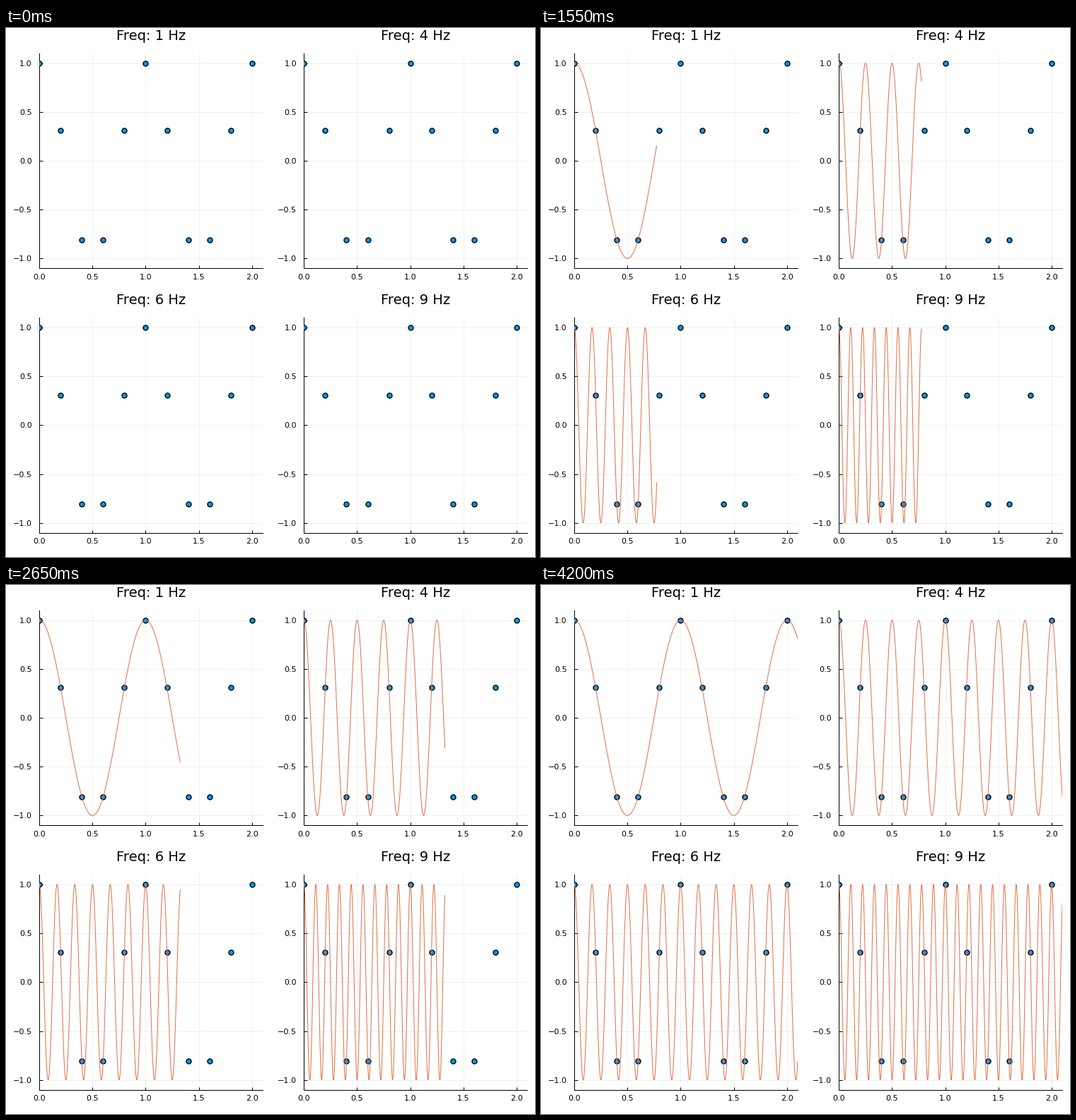
Write a matplotlib script that moves like this. It is 748 by 749 pixels and loops after 4250 ms.

```python
import numpy as np
import matplotlib.pyplot as plt
from matplotlib.animation import FuncAnimation

W, H, DPI = 748, 749, 100
FRAMES, INTERVAL = 85, 50
PX = 72 / DPI  # points per pixel
STEP, PER_FRAME = 0.001, 25

plt.rcParams["font.family"] = "DejaVu Sans"
plt.rcParams["path.simplify"] = False

fig = plt.figure(figsize=(W / DPI, H / DPI), dpi=DPI, facecolor="white")

t = np.arange((FRAMES - 1) * PER_FRAME + 1) * STEP
samples = np.arange(11) * 0.2


def make_panel(freq, left, top, width=315.8, height=304.2):
    ax = fig.add_axes([left / W, 1 - (top + height) / H, width / W, height / H])
    ax.set(xlim=(0, 2.1), ylim=(-1.1, 1.1))
    ax.set_xticks(np.arange(0, 2.1, 0.5))
    ax.set_yticks(np.arange(-1, 1.1, 0.5))
    ax.xaxis.set_major_formatter("{x:.1f}")
    ax.yaxis.set_major_formatter("{x:.1f}")
    ax.tick_params(direction="in", length=4.5 * PX, width=PX, labelsize=8)
    ax.tick_params(axis="x", pad=7.6 * PX)
    ax.tick_params(axis="y", pad=10.3 * PX)
    ax.grid(color="black", alpha=0.06, linewidth=PX)
    ax.set_axisbelow(True)
    ax.spines[["top", "right"]].set_visible(False)
    ax.spines[["left", "bottom"]].set_linewidth(PX)

    fig.text((left + width / 2) / W, 1 - (top - 18.8) / H, f"Freq: {freq} Hz",
             size=14, ha="center", va="baseline")
    ax.plot(samples, np.cos(2 * np.pi * samples), "o", color="#009afa",
            markersize=7 * PX, markeredgecolor="black",
            markeredgewidth=1.4 * PX, zorder=3)
    line, = ax.plot([], [], color="#e26f46", linewidth=PX, zorder=4,
                    solid_capstyle="butt")
    return line, np.cos(2 * np.pi * freq * t)


panels = [
    make_panel(freq, 47.1 + 374.2 * (i % 2), 35.9 + 374.4 * (i // 2))
    for i, freq in enumerate((1, 4, 6, 9))
]


def update(frame):
    n = frame * PER_FRAME + 1
    for line, wave in panels:
        line.set_data(t[:n], wave[:n])
    return [line for line, _ in panels]


anim = FuncAnimation(fig, update, frames=FRAMES, interval=INTERVAL,
                     repeat=True, repeat_delay=0)
plt.show()
```
